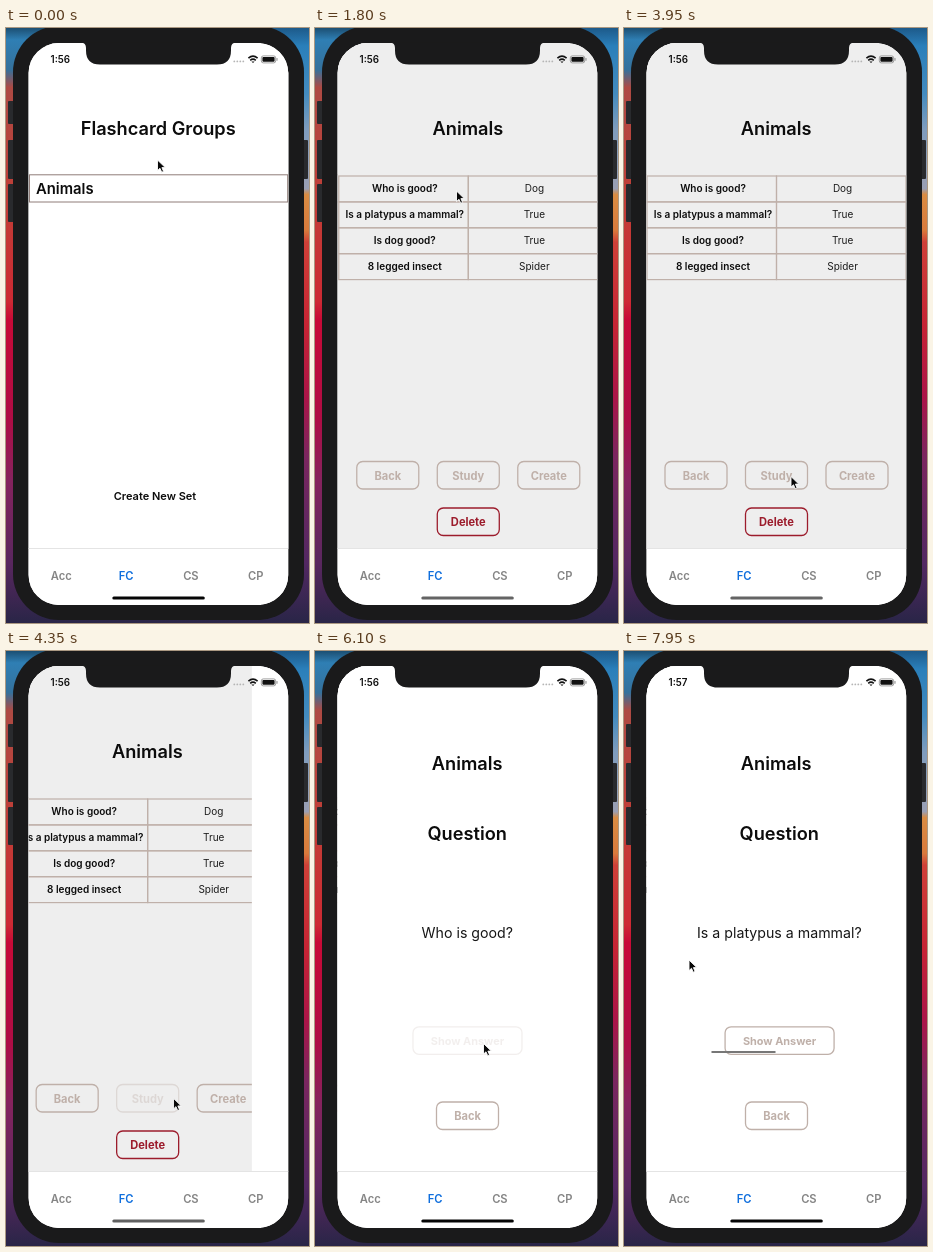
Animation of 303x595 px, one loop 8 s. Source, as an HTML page:

```html
<!DOCTYPE html>
<html lang="en">
<head>
<meta charset="utf-8">
<title>Flashcards</title>
<style>
html, body { margin: 0; width: 100%; height: 100%; overflow: hidden; background: #1a1a1a; }
svg { display: block; width: 303px; height: 595px; font-family: Inter, Roboto, sans-serif; }
</style>
</head>
<body>
<svg id="stage" viewBox="0 0 303 595"></svg>
<script>
const LOOP = 8000, WIDTH = 260;
const TAN = '#bfb0a9', RED = '#9c1c2c';

const text = (s, x, y, size, weight = 600, fill = '#0c0c0c', anchor = 'middle') =>
  `<text x="${x}" y="${y}" font-size="${size}" font-weight="${weight}" fill="${fill}" text-anchor="${anchor}">${s}</text>`;
const rect = (x, y, w, h, fill, extra = '') =>
  `<rect x="${x}" y="${y}" width="${w}" height="${h}" fill="${fill}" ${extra}/>`;
const group = (id, body, extra = '') => `<g id="${id}" ${extra}>${body}</g>`;
const button = (label, cx, y, w = 62, color = TAN, size = 11.1) =>
  rect(cx - w / 2, y, w, 27.5, 'none', `rx="6" stroke="${color}" stroke-width="1.3"`) +
  text(label, cx, y + 18, size, 700, color);
const gradient = (id, stops) =>
  `<linearGradient id="${id}" x2="0" y2="1">` +
  stops.map(([at, c]) => `<stop offset="${at}" stop-color="${c}"/>`).join('') + '</linearGradient>';

const defs = '<defs>' +
  gradient('leftWall', [[0, '#1c4f73'], [.02, '#2f7fb4'], [.07, '#35719c'], [.1, '#ae4a43'], [.3, '#c23d36'],
    [.46, '#cd2a33'], [.49, '#c80a37'], [.66, '#ae0d45'], [.76, '#86235e'], [.9, '#59275f'], [1, '#292547']]) +
  gradient('rightWall', [[0, '#1d5a8a'], [.03, '#2a7fba'], [.11, '#438bbf'], [.17, '#7f9cbd'], [.27, '#9a9fb3'], [.28, '#d98c43'],
    [.34, '#d87a3c'], [.36, '#cf4038'], [.5, '#c62434'], [.62, '#ab1548'], [.72, '#7b265f'], [.9, '#522862'], [1, '#292547']]) +
  `<clipPath id="screenClip">${rect(22.6, 15.1, 259.6, 561.8, '#fff', 'rx="30"')}</clipPath>` +
  `<clipPath id="pageClip">${rect(22, 0, 261, 520.5, '#fff')}</clipPath></defs>`;

const phone =
  rect(0, 0, 152, 595, 'url(#leftWall)') + rect(152, 0, 151, 595, 'url(#rightWall)') +
  [[2, 73, 23], [2, 112, 39], [2, 156, 38], [296, 112, 39]]
    .map(([x, y, h]) => rect(x, y, 6, h, '#292a2d', 'rx="1"')).join('') +
  rect(7, -2, 291, 594, '#1a1a1b', 'rx="46"');

const page = fill => rect(22, 0, 261, 521, fill);
const title = (s, y) => text(s, 152.2, y, 18.2);

const groupsPage =
  page('#fff') + title('Flashcard Groups', 106.8) +
  group('row', rect(23.5, 146.8, 258.2, 27.2, 'none', 'stroke="#8f7d79"') +
    text('Animals', 30, 165.6, 14.8, 600, '#0c0c0c', 'start')) +
  text('Create New Set', 149, 472, 11);

const facts = [['Who is good?', 'Dog'], ['Is a platypus a mammal?', 'True'],
  ['Is dog good?', 'True'], ['8 legged insect', 'Spider']];
const setPage =
  page('#eeeeee') + title('Animals', 107.3) +
  facts.map(([q, a], i) => {
    const y = 148 + 25.9 * i, box = `stroke="${TAN}" stroke-width="1.2"`;
    return rect(23, y, 129.5, 25.9, 'none', box) + rect(152.5, y, 129.5, 25.9, 'none', box) +
      text(q, 89, y + 16.2, 10) + text(a, 218.6, y + 16.2, 10, 400, '#1c1c1c');
  }).join('') +
  button('Back', 72, 433.5) + group('study', button('Study', 152.5, 433.5)) +
  button('Create', 233, 433.5) + button('Delete', 152.5, 480, 62, RED);

const card = (i, faces) =>
  `<g transform="translate(${i * WIDTH})">${faces}` +
  group('show' + i, button('Show Answer', 152.5, 375.8, 109, TAN, 10.9)) + '</g>';
const face = (head, body) => title(head, 189) + text(body, 152.3, 286.5, 14.2, 400, '#161616');
const studyPage =
  page('#fff') + title('Animals', 119) +
  group('cards',
    card(0, group('front', face('Question', facts[0][0])) + group('back', face('Answer', facts[0][1]))) +
    card(1, face('Question', facts[1][0]))) +
  group('thumb', rect(23, 400, 64.5, 2, '#777', 'rx="1"')) +
  button('Back', 152.5, 451);

const tabs = rect(22, 520.5, 261, 57, '#fff') + rect(22, 520, 261, 1, '#e4e4e4') +
  ['Acc', 'FC', 'CS', 'CP'].map((s, i) =>
    text(s, 55.3 + i * 64.8, 552, 11.2, 600, i === 1 ? '#106fdd' : '#858585')).join('') +
  group('home', rect(106.3, 568.4, 92.5, 3, '#050505', 'rx="1.5"'));

const status =
  '<path d="M75 14.8H230Q225 14.8 225 20V22.6Q225 36.6 211 36.6H94Q80 36.6 80 22.6V20Q80 14.8 75 14.8Z" fill="#1a1a1b"/>' +
  '<g transform="translate(0 .6)">' +
  '<text id="clock" x="44.6" y="34.2" font-size="9.8" font-weight="600" fill="#111"></text>' +
  [0, 1, 2, 3].map(i => `<circle cx="${228.3 + i * 3}" cy="32.8" r=".9" fill="#b5b5b5"/>`).join('') +
  '<g fill="none" stroke="#111" stroke-width="1.6"><path d="M242.4 29.6Q247 25.6 251.6 29.6"/>' +
  '<path d="M244.2 31.7Q247 29.4 249.8 31.7"/></g><path d="M245.4 32.8H248.6L247 34.5Z" fill="#111"/>' +
  rect(255.3, 27.3, 14.4, 7, 'none', 'rx="2" stroke="#8a8a8a" stroke-width=".8"') +
  rect(256.4, 28.4, 12.2, 4.8, '#111', 'rx="1"') + rect(270.5, 29.5, 1, 2.6, '#8a8a8a', 'rx=".5"') + '</g>';

const stage = document.getElementById('stage');
stage.innerHTML = defs + phone +
  `<g clip-path="url(#screenClip)">${rect(22, 14, 261, 563, '#fff')}<g clip-path="url(#pageClip)">` +
  group('groups', groupsPage) + group('set', setPage) + group('quiz', studyPage) +
  `</g>${tabs}</g>${status}` +
  group('cursor', '<path d="M0 0V10.6L2.5 8.3L4.2 12.2L6.1 11.4L4.4 7.6H7.8Z" fill="#080808" stroke="#fff" stroke-width=".9" stroke-linejoin="round"/>');

const el = {};
stage.querySelectorAll('[id]').forEach(n => el[n.id] = n);

// Eased value from [time, ...values] steps
function track(keys, t) {
  let i = 0;
  while (i < keys.length - 1 && keys[i + 1][0] <= t) i++;
  const a = keys[i], b = keys[i + 1];
  if (!b) return a.slice(1);
  const p = Math.max(0, (t - a[0]) / (b[0] - a[0])), e = p * p * (3 - 2 * p);
  return a.slice(1).map((v, k) => v + (b[k + 1] - v) * e);
}

const pointer = [[0, 151.5, 132], [850, 143, 160.5], [1350, 143, 160.5], [1800, 141.5, 163], [2100, 141.5, 163],
  [3800, 167, 448.5], [4330, 167, 448.5], [4690, 213.5, 330.5], [5450, 226, 307], [5550, 226, 307],
  [5950, 168.5, 392.5], [6750, 168.5, 392.5], [7500, 230, 330], [7600, 230, 330], [7820, 65, 309]];
const press = {
  row: [[1230, 1], [1340, .23], [1420, .23], [1620, 1]],
  study: [[4100, 1], [4200, .2], [4300, .2], [4480, 1]],
  show0: [[5950, 1], [6090, .2], [6240, .2], [6400, 1]],
  home: [[1420, 1], [1720, .62], [4320, .62], [4620, 1]],
  thumb: [[7590, 0], [7660, 1]]
};

// Remaining share of a push that settles like a critically damped spring
function push(t, start) {
  const s = Math.max(0, t - start) * .021;
  return (1 + s) * Math.exp(-s);
}

// Drag with the pointer, then settle on the next card
function swipe(t) {
  if (t < 7790) return track([[7600, 0], [7790, 165]], t)[0];
  return WIDTH - 95 * Math.exp(-(t - 7790) * .0213);
}

const move = (node, x, y = 0) => node.setAttribute('transform', `translate(${x.toFixed(2)} ${y.toFixed(2)})`);
const show = (node, on) => node.setAttribute('display', on ? 'inline' : 'none');

function draw(t) {
  const first = push(t, 1420), second = push(t, 4320), scroll = swipe(t);
  move(el.groups, -78 * (1 - first));
  move(el.set, WIDTH * first - 78 * (1 - second));
  move(el.quiz, WIDTH * second);
  move(el.cards, -scroll);
  move(el.thumb, scroll / 4);
  move(el.cursor, ...track(pointer, t));
  for (const id in press) el[id].setAttribute('opacity', track(press[id], t)[0].toFixed(3));
  show(el.front, t < 6250);
  show(el.back, t >= 6250);
  el.clock.textContent = t < 7000 ? '1:56' : '1:57';
}

const start = performance.now();
(function tick() {
  draw((performance.now() - start) % LOOP);
  requestAnimationFrame(tick);
})();
</script>
</body>
</html>
```
